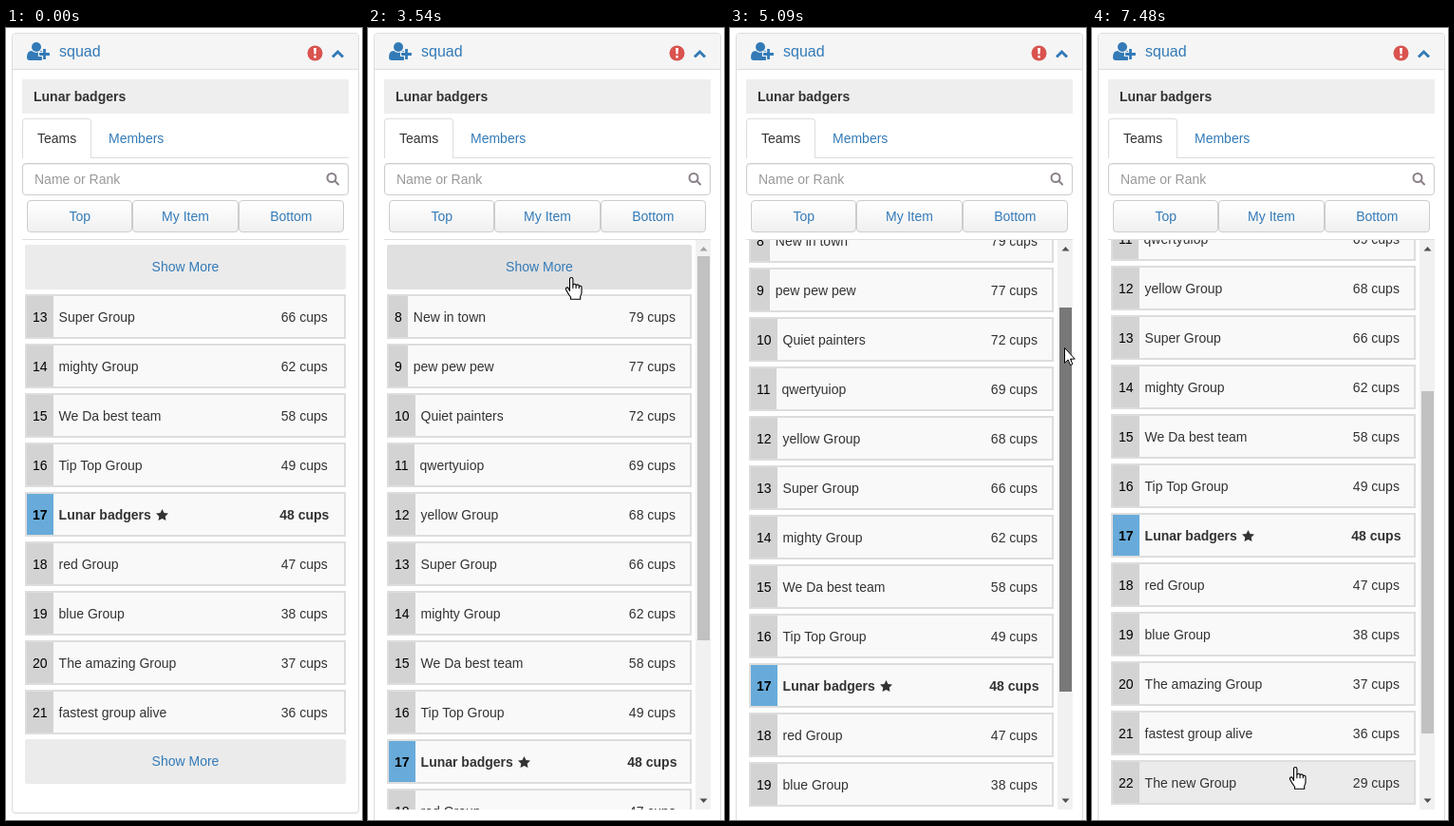
Recreate the animation shown at these times as an HTML page. Size 375x833 px, loop 8 s.

```html
<!DOCTYPE html>
<html lang="en">
<head>
<meta charset="utf-8">
<title>Team ranking</title>
<style>
  * { box-sizing: border-box; }
  html, body { margin: 0; width: 100%; height: 100%; overflow: hidden; background: #fff; }
  body { font: 14px/20px "Liberation Sans", Arial, sans-serif; color: #333; }
  #stage { position: relative; width: 375px; height: 833px; overflow: hidden; }
  #stage > * { position: absolute; }
  .blue { color: #337ab7; }
  #panel { left: 6px; top: 5px; width: 366px; border: 1px solid #ddd; border-radius: 4px; box-shadow: 0 1px 1px rgba(0,0,0,.05); }
  #head { left: 7px; top: 6px; width: 364px; height: 38px; background: #f5f5f5; border-bottom: 1px solid #ddd; border-radius: 3px 3px 0 0; }
  #title { left: 56px; top: 5px; font-size: 16px; line-height: 40px; }
  #group { left: 17px; top: 54px; width: 344px; height: 36px; padding-left: 12px; background: #eee; font-weight: bold; line-height: 36px; }
  .line { left: 17px; width: 344px; height: 1px; background: #ddd; }
  #tab { left: 17px; top: 95px; height: 42px; padding: 10px 15px; border: 1px solid #ddd; border-bottom: 0; border-radius: 4px 4px 0 0; background: #fff; }
  #members { left: 108px; top: 106px; }
  #search { left: 17px; top: 142px; width: 344px; height: 34px; padding-left: 12px; border: 1px solid #ccc; border-radius: 4px; line-height: 32px; color: #999; box-shadow: inset 0 1px 1px rgba(0,0,0,.075); }
  #buttons { left: 22px; top: 181px; width: 334px; display: flex; }
  #buttons div { flex: 1; height: 34px; border: 1px solid #ccc; border-radius: 4px; line-height: 32px; text-align: center; background: linear-gradient(#fff, #f0f0f0); }
  #view { left: 17px; top: 223px; width: 344px; height: 599px; overflow: hidden; }
  #list { padding: 5px 3px 0; }
  #list > * { height: 47px; margin-bottom: 5px; }
  .more { background: #ebebeb; border-radius: 2px; line-height: 46px; text-align: center; }
  .more.hover { background: #e0e0e0; }
  .row { display: flex; border: 2px solid #ddd; background: #f9f9f9; line-height: 44px; white-space: nowrap; }
  .row.hover { background: #ebebeb; }
  .rank { padding: 0 6px; background: #d3d3d3; color: #000; }
  .name { flex: 1; padding-left: 6px; }
  .name svg { margin-left: 5px; vertical-align: -1px; }
  .cups { width: 25%; text-align: center; }
  .own { font-weight: bold; }
  .own .rank { background: #68abda; }
  [hidden] { display: none !important; }
  #icons, #bar { left: 0; top: 0; }
  #cursor { left: 0; top: 0; overflow: visible; }
</style>
</head>
<body>
<div id="stage">
  <div id="panel"></div>
  <div id="head"></div>
  <div id="title" class="blue">squad</div>
  <div id="group">Lunar badgers</div>
  <div class="line" style="top:136px"></div>
  <div id="tab">Teams</div>
  <div id="members" class="blue">Members</div>
  <div id="search">Name or Rank</div>
  <div id="buttons" class="blue"><div>Top</div><div>My Item</div><div>Bottom</div></div>
  <div class="line" style="top:222px"></div>
  <div id="view"><div id="list"></div></div>
  <svg id="icons" width="375" height="222">
    <g fill="#337ab7">
      <circle cx="32" cy="20" r="5"/>
      <path d="M22 31q0-7 5-7q5 4 10 0q5 0 5 7q0 3-3 3H25q-3 0-3-3z"/>
      <path d="M38.5 21.5h4v4h4v4h-4v4h-4v-4h-4v-4h4z" stroke="#f5f5f5" stroke-width="1.2"/>
    </g>
    <circle cx="325.5" cy="26.5" r="8" fill="#d9534f"/>
    <path d="M324 21h3l-.5 6.5h-2zM324.3 29h2.4v2.4h-2.4z" fill="#fff"/>
    <path d="M344 30.5l5.5-5.5 5.5 5.5" fill="none" stroke="#337ab7" stroke-width="3"/>
    <g fill="none" stroke="#8a8088" stroke-width="2">
      <circle cx="343" cy="157.5" r="4.5"/>
      <path d="M346.3 160.8l3.7 3.7" stroke-linecap="round"/>
    </g>
  </svg>
  <svg id="bar" width="375" height="833">
    <path d="M345 223h16v599h-16z" fill="#f1f1f1"/>
    <path id="up" d="M349.5 234.5h8l-4-4.5z"/>
    <path id="down" d="M349.5 810.5h8l-4 4.5z"/>
    <rect id="thumb" x="347" width="13"/>
  </svg>
  <svg id="cursor" width="1" height="1" stroke-linejoin="round">
    <path id="arrow" d="M.5 .5v15.8l3.6-3.4 2.5 5.7 2.3-1-2.4-5.5h4.8z" fill="#fff" stroke="#000"/>
    <g id="hand" fill="#fff" stroke="#000" stroke-width="1.1">
      <path d="M-1.5 14.5V2.2a1.7 1.7 0 0 1 3.4 0V8.6a1.6 1.6 0 0 1 3.2.6a1.6 1.6 0 0 1 3.2.7a1.5 1.5 0 0 1 2.7.9V16q0 2.5-1.3 4v3.3H-.5V21Q-3 18-5.3 13.5c-1.2-2 1.2-3.4 2.4-1.8z"/>
      <path d="M1.9 8.6v3.6M5.1 9.2v3M8.3 9.9v2.3" fill="none"/>
    </g>
  </svg>
</div>
<script>
const LOOP = 8000, EXPAND = 2300, PRESS = 4540, RELEASE = 5930, APPEND = 7480;
const FIRST_RANK = 8, OWN_RANK = 17;
const TEAMS = [
  ['New in town', 79], ['pew pew pew', 77], ['Quiet painters', 72], ['qwertyuiop', 69],
  ['yellow Group', 68], ['Super Group', 66], ['mighty Group', 62], ['We Da best team', 58],
  ['Tip Top Group', 49], ['Lunar badgers', 48], ['red Group', 47], ['blue Group', 38],
  ['The amazing Group', 37], ['fastest group alive', 36], ['The new Group', 29]
];
// Pointer moves: start, end, number of steps
const MOVES = [
  [670, 1450, 11], [1520, 2000, 7], [3540, 4310, 11], [4850, 5650, 11],
  [5710, 5790, 2], [6330, 7100, 11], [7180, 7330, 3]
];
// Pointer hotspot: time, x, y
const PATH = [
  [670, 371, 598], [1060, 275, 440], [1450, 214, 313], [1520, 204, 299], [2000, 206, 252],
  [3540, 214, 262], [4310, 354, 282], [4850, 354, 287], [5330, 350, 385], [5650, 348, 474],
  [5790, 348, 486], [6330, 346, 493], [6700, 272, 670], [7100, 220, 772], [7330, 214, 777]
];

const $ = id => document.getElementById(id);
const setAttrs = (id, attrs) => {
  for (const name in attrs) $(id).setAttribute(name, attrs[name]);
};

const star = `<svg width="13" height="12" viewBox="0 0 13 12"><path fill="#333"
  d="M6.5 0l2 4 4.5.6-3.3 3.2.8 4.2-4-2-4 2 .8-4.2L0 4.600 4.500 4z"/></svg>`;
const more = '<div class="more blue">Show More</div>';
$('list').innerHTML = more + TEAMS.map(([name, cups], i) => {
  const rank = FIRST_RANK + i, own = rank === OWN_RANK;
  return `<div class="row${own ? ' own' : ''}" data-rank="${rank}"><span class="rank">${rank}</span>` +
    `<span class="name">${name}${own ? star : ''}</span><span class="cups">${cups} cups</span></div>`;
}).join('') + more;
const items = [...$('list').children];

function pointerAt(t) {
  const move = MOVES.filter(m => m[0] <= t).pop();
  if (!move) return null;
  const [start, end, steps] = move;
  const step = (end - start) / (steps - 1);
  const time = Math.min(end, start + Math.floor((t - start + 15) / step) * step);
  const next = PATH.findIndex(p => p[0] >= time);
  const b = PATH[next], a = PATH[Math.max(0, next - 1)];
  const u = b === a ? 0 : (time - a[0]) / (b[0] - a[0]);
  return { x: Math.round(a[1] + (b[1] - a[1]) * u), y: Math.round(a[2] + (b[2] - a[2]) * u) };
}

function render(t) {
  const expanded = t >= EXPAND, appended = t >= APPEND;
  const pointer = pointerAt(t);
  const drag = t < PRESS ? 0 : Math.max(0, Math.min(161, pointer.y - 282));
  const scroll = Math.ceil(drag * 238 / 161);

  const lowest = expanded ? 8 : 13, highest = appended ? 22 : 21;
  for (const item of items) {
    const rank = +item.dataset.rank;
    item.hidden = rank > 0 && (rank < lowest || rank > highest);
  }
  $('panel').style.height = (expanded ? 900 : 821) + 'px';
  $('list').style.width = (expanded ? 327 : 344) + 'px';
  $('list').style.transform = `translateY(${-scroll}px)`;

  let hovered = null;
  if (pointer && pointer.x >= 20 && pointer.x < (expanded ? 341 : 358)) {
    const offset = pointer.y + scroll - 228;
    if (offset >= 0 && offset % 52 < 47) hovered = items.filter(item => !item.hidden)[Math.floor(offset / 52)];
  }
  for (const item of items) item.classList.toggle('hover', item === hovered);

  $('bar').style.display = expanded ? '' : 'none';
  const top = appended ? 382 : 240 + drag, height = appended ? 360 : 404;
  const onThumb = pointer && pointer.x >= 347 && pointer.y >= top && pointer.y < top + height;
  const pressed = t >= PRESS && t < RELEASE;
  setAttrs('thumb', { y: top, height, fill: pressed ? '#787878' : onThumb ? '#a8a8a8' : '#c1c1c1' });
  setAttrs('up', { fill: scroll ? '#505050' : '#a3a3a3' });
  setAttrs('down', { fill: scroll < 238 || appended ? '#505050' : '#a3a3a3' });

  $('cursor').style.display = pointer ? '' : 'none';
  if (pointer) $('cursor').style.transform = `translate(${pointer.x}px, ${pointer.y}px)`;
  $('hand').style.display = hovered ? '' : 'none';
  $('arrow').style.display = hovered ? 'none' : '';
}

const begin = performance.now();
function tick() {
  render((performance.now() - begin) % LOOP);
  requestAnimationFrame(tick);
}
tick();
</script>
</body>
</html>
```
